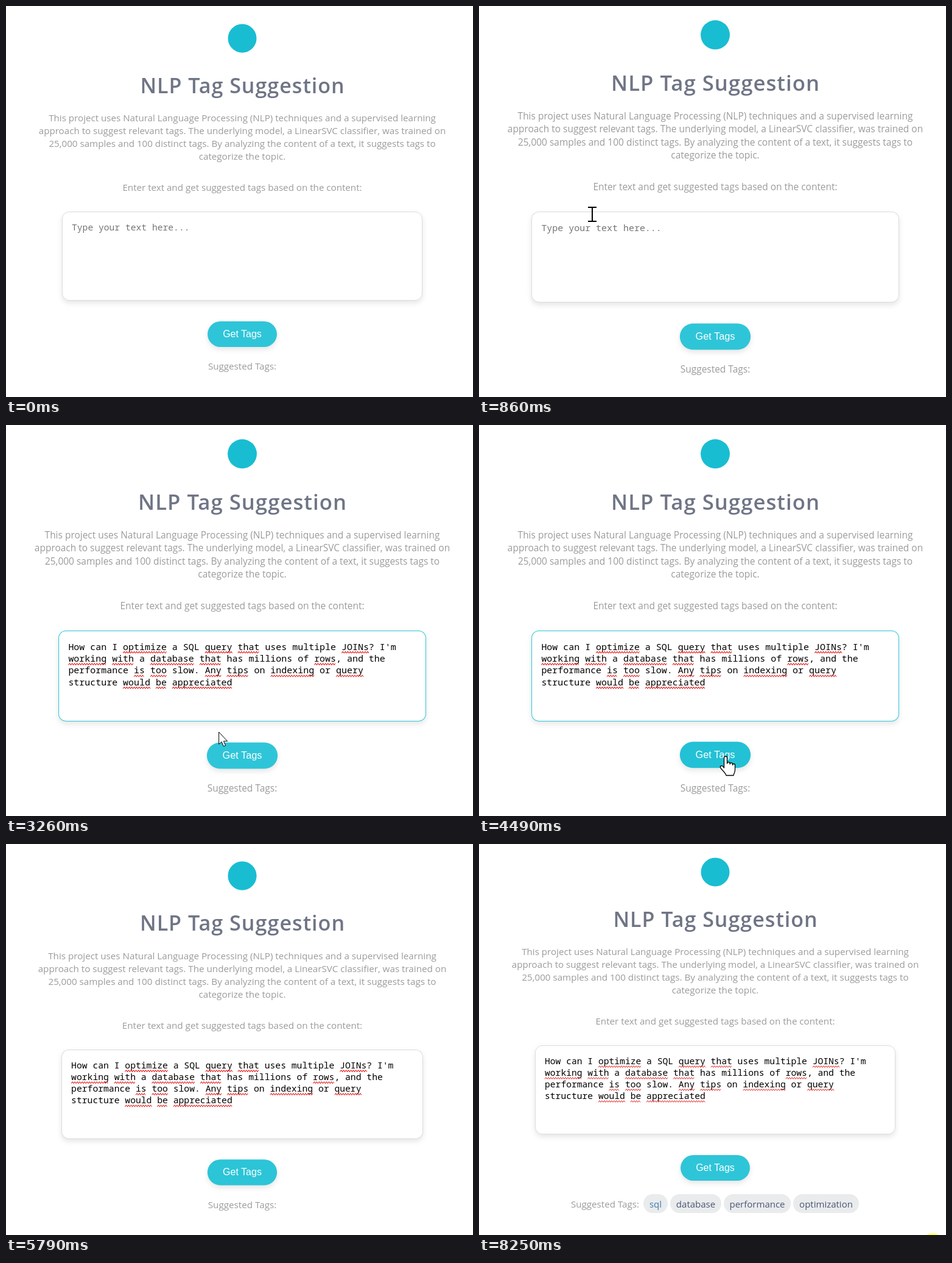
Animation, 767 px wide and 641 px high, one loop 8580 ms. Source, as an HTML page:

```html
<!DOCTYPE html>
<html lang="en">
<head>
<meta charset="utf-8">
<title>NLP Tag Suggestion</title>
<style>
  html, body { margin: 0; width: 100%; height: 100%; overflow: hidden; background: #fff; }
  svg { display: block; }
  text { font: 15.17px "Open Sans", sans-serif; fill: #9b9b9d; text-anchor: middle; white-space: pre; }
  #title { font-size: 34px; font-weight: 600; letter-spacing: 1px; fill: #6f7585; }
  #field { fill: #fff; filter: drop-shadow(0 4px 4px rgba(0, 0, 0, .1)); }
  #button rect { filter: drop-shadow(0 4px 4px rgba(0, 0, 0, .1)); }
  #button text { font: 16px "Liberation Sans", sans-serif; fill: #fff; }
  .mono text { font: 500 14.667px "Noto Sans Mono", monospace; fill: #000; text-anchor: start; }
  .mono path { fill: none; stroke: #f02020; }
  .mono #placeholder { fill: #757575; }
  #tags rect { fill: #e9ebec; }
  #tags text { font-size: 15px; fill: #4b5675; }
  #tags g:first-child text { fill: #3f7cb0; }
  #halo { fill: #ffff60; mix-blend-mode: multiply; }
  #cursor path { stroke-linejoin: round; }
</style>
</head>
<body>
<svg width="767" height="641" viewBox="0 0 767 641">
  <g id="card">
    <circle cx="388" cy="53" r="23.5" fill="#18bdd2"/>
    <text id="title" x="388.5" y="143">NLP Tag Suggestion</text>
    <g id="intro"></g>
    <text x="388" y="303">Enter text and get suggested tags based on the content:</text>
    <rect id="field" x="92.5" y="337.5" width="591" height="145" rx="11.5"/>
    <g class="mono">
      <text id="placeholder" x="108" y="368">Type your text here...</text>
      <g id="question"></g>
    </g>
    <rect id="caret" x="108" y="353" width="1" height="20"/>
    <g id="button">
      <rect x="331" y="517" width="114" height="42" rx="21"/>
      <text x="388" y="543">Get Tags</text>
    </g>
    <text id="label">Suggested Tags:</text>
    <g id="tags"></g>
  </g>
  <circle id="halo" r="19"/>
  <g id="cursor">
    <path id="beam" d="M-7-12H7M-7 11H7M0-12V11" fill="none" stroke="#000" stroke-width="2"/>
    <path id="hand" fill="#fff" stroke="#000" stroke-width="1.3" d="M-2.5 2.5a2.5 2.5 0 0 1 5 0V12a2.3 2.3 0 0 1 4.6 0v1a2.2 2.2 0 0 1 4.4 0v1.5a2 2 0 0 1 4 0V22c0 5-2 6-2.5 9.5H1c-1-4-6-8-9-12-2-3 1-5 3.5-3l2 2.5Z"/>
    <path id="arrow" fill="#fff" stroke="#000" d="M0 0V20l4.5-4 3.3 7.5 3.2-1.4-3.2-7.1h6.2Z"/>
  </g>
</svg>
<script>
const LOOP = 8580;
const PASTE = 2770, CLICK_FIELD = 1610, CLICK_BUTTON = 4960, LEAVE = 5610, RESULT = 6130, STOP = 8250;
const el = id => document.getElementById(id);

const intro = [
  'This project uses Natural Language Processing (NLP) techniques and a supervised learning',
  'approach to suggest relevant tags. The underlying model, a LinearSVC classifier, was trained on',
  '25,000 samples and 100 distinct tags. By analyzing the content of a text, it suggests tags to',
  'categorize the topic.'
];
const question = [
  "How can I optimize a SQL query that uses multiple JOINs? I'm",
  'working with a database that has millions of rows, and the',
  'performance is too slow. Any tips on indexing or query',
  'structure would be appreciated'
];
const misspelt = /\b(optimize|query|that|JOINs|working|with|database|rows|is|too|Any|tips|indexing|would|be|appreciated)\b/g;
const tags = [['sql', 270, 310], ['database', 314, 398], ['performance', 402, 512], ['optimization', 516, 624]];

function squiggle(x, y, width) {
  let d = `M${x} ${y + 1.3}`;
  for (let i = 1; i * 2 <= width; i++) d += `L${x + i * 2} ${y + (i % 2 ? -1.3 : 1.3)}`;
  return `<path d="${d}"/>`;
}

el('intro').innerHTML = intro.map((line, i) => `<text x="388" y="${189 + 21 * i}">${line}</text>`).join('');
el('question').innerHTML = question.map((line, i) => {
  const y = 368 + 19 * i;
  const marks = [...line.matchAll(misspelt)].map(m => squiggle(108 + 8.8 * m.index, y + 4, 8.8 * m[0].length));
  return `<text x="108" y="${y}">${line}</text>` + marks.join('');
}).join('');
el('tags').innerHTML = tags.map(([name, left, right]) =>
  `<g><rect x="${left}" y="581" width="${right - left}" height="31" rx="15.5"/>` +
  `<text x="${(left + right) / 2}" y="603">${name}</text></g>`).join('');

// Pointer stops: time, x, y
const pointer = [
  [260, 240, 660], [600, 212, 480], [860, 186, 342], [925, 186, 342], [1070, 150, 354], [1360, 126, 350],
  [CLICK_FIELD + 60, 126, 350], [1850, 155, 366], [2090, 187, 388], [2155, 187, 388], [2440, 187, 400],
  [PASTE, 187, 400], [3150, 320, 480], [3450, 400, 543], [3640, 410, 546], [3750, 522, 556],
  [3880, 530, 424], [4280, 530, 424], [4450, 405, 543], [5450, 405, 543]
];

function pointerAt(t) {
  const next = pointer.findIndex(stop => stop[0] > t);
  if (next < 1) return null;
  const [t0, x0, y0] = pointer[next - 1], [t1, x1, y1] = pointer[next];
  const p = (t - t0) / (t1 - t0);
  return [x0 + (x1 - x0) * p, y0 + (y1 - y0) * p];
}

const within = (t, from, to) => t >= from && t < to;
const ramp = (t, start) => 1 - (1 - Math.min(1, Math.max(0, (t - start) / 300))) ** 2;
const pulse = (t, from, to) => ramp(t, from) - ramp(t, to);
const mix = (a, b, p) => `color-mix(in srgb, ${b} ${p * 100}%, ${a})`;
const show = (id, on) => el(id).setAttribute('visibility', on ? 'visible' : 'hidden');
const move = (id, x, y) => el(id).setAttribute('transform', `translate(${x} ${y})`);

function drawPointer(t) {
  const at = pointerAt(t);
  const inside = (left, top, right, bottom) =>
    at && at[0] > left && at[0] < right && at[1] > top && at[1] < bottom;
  const inField = inside(86, 337, 690, 486), onButton = inside(330, 518, 446, 563);
  show('beam', inField);
  show('hand', onButton);
  show('arrow', at && !inField && !onButton);
  if (at) move('cursor', ...at);

  const clicking = within(t, CLICK_FIELD, CLICK_FIELD + 140) || within(t, CLICK_BUTTON, CLICK_BUTTON + 140);
  show('halo', clicking || t >= STOP);
  if (clicking) move('halo', ...at);
  else move('halo', 745, 657);
}

function draw(t) {
  const done = t >= RESULT, pasted = t >= PASTE;
  const scale = 1 + .02 * pulse(t, 300, LEAVE);
  el('card').setAttribute('transform',
    `translate(388 ${done ? 330 : 337}) scale(${scale}) translate(-388 -337)`);

  el('field').style.stroke = mix('#dcdcde', '#2fc5d8', pulse(t, CLICK_FIELD, CLICK_BUTTON));
  show('placeholder', !pasted);
  show('question', pasted);
  show('caret', within(t, CLICK_FIELD, 2160));

  const hover = pulse(t, 3400, 3680) + pulse(t, 4380, LEAVE);
  el('button').firstElementChild.style.fill = mix('#2fc5d8', '#1bbfd3', hover);
  move('button', 0, -2 * hover);

  move('label', done ? 207 : 388, done ? 603 : 596);
  show('tags', done);
  drawPointer(t);
}

function tick() {
  draw(performance.now() % LOOP);
  requestAnimationFrame(tick);
}
tick();
</script>
</body>
</html>
```
